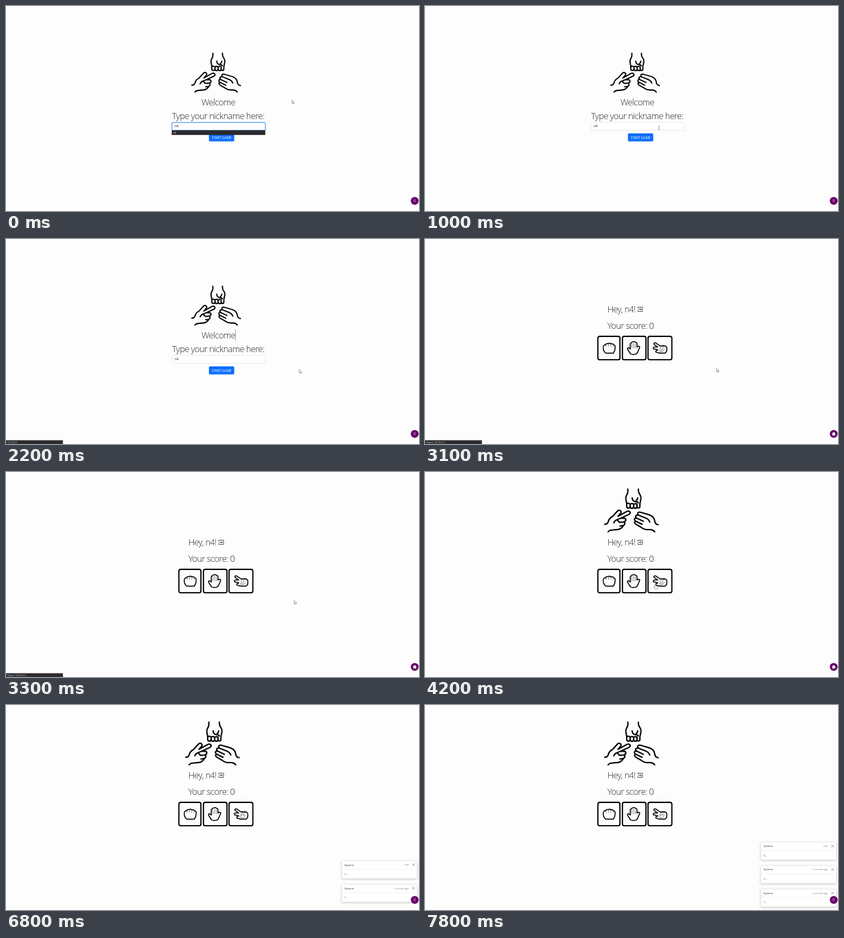
Animation of 600x299 px, one loop 8 s. Source, as an HTML page:

```html
<!DOCTYPE html>
<html lang="en">
<head>
<meta charset="utf-8">
<title>Rock paper scissors</title>
<style>
  html, body { margin: 0; width: 100%; height: 100%; overflow: hidden; background: #fefdfe; }
  svg { display: block; width: 600px; height: 299px; font-family: "Open Sans", sans-serif; fill: #212529; }
  .big { font-size: 12.7px; font-weight: 300; letter-spacing: -.04em; }
  .line { fill: none; stroke: #000; stroke-width: 1.8; stroke-linecap: round; stroke-linejoin: round; }
  .small { font-size: 4.8px; }
  .toast text { font-size: 3.9px; fill: #555b61; }
  .toast .age { font-size: 3.4px; fill: #7d848a; text-anchor: end; }
  .toast { filter: drop-shadow(0 1px 1.5px #0003); }
</style>
</head>
<body>
<svg viewBox="0 0 600 299">
  <defs>
    <g id="hands" class="line">
      <!-- rock -->
      <path d="M31.5 .8V4.5Q31.5 6.5 29.8 9 28.6 11 28.9 14L30 20M45.5 .8V3.5Q45.7 6 48 9 49.2 11 48.8 14L47.5 20M30 20v3.8q.2 2.4 2.3 2.4t2.3-2.4V21M34.6 21v2.8q.2 2.6 2.3 2.6t2.3-2.6V21M39.2 21v2.8q.2 2.6 2.2 2.6t2.2-2.6V20.5M43.6 23.8q.2 2.2 2 2.2t1.9-2.4V20M30 20.5q2.3-2 4.6.5 2.3-2 4.6 0 2.2-1.5 4.4-.3M37.2 12.5Q37.5 17 41.5 17.5q3 0 3.8 1.5M44.5 12.5q0 2.5-2 3.5"/>
      <!-- scissors -->
      <path d="M1 47.5Q4.5 47.5 5.5 44.5 7 39 11 37.5L18 29.8q2-1.7 3.7-.2t.2 3.4L18.5 37 30.5 30.3q2.8-1 3.8.9t-1.3 3.2L22 39.5M22 39.5l4.5-.2q2.5.4 2.3 2.6t-3 2.6l-5 .4M26.8 44.6q1.5 1.6.3 3.3t-6 1.8M25.5 49.5Q23 54 17.5 54.5L12 55Q7.5 55 5.5 57.5M13 45.5Q14.5 42 17.5 41.3L22 39.5M18 41.3q.3 2.6 3 3.6"/>
      <!-- paper -->
      <path d="M71.5 48Q67.5 47.5 67 43 66.5 37.5 60 35L48 31.5q-3-.5-3.5 1.5-.3 1.5 1.5 2.5l9 3.7M46 35.5q-3-1-4 .8-.6 2 1.5 3.2l8.5 4M43.5 39.5q-3-.8-3.3 1.3 0 1.7 2 2.7l8 4M42.2 43.5q-2.2.3-1.7 2 .5 1.5 2 2.2l7 4q3 2.8 8 2.8h4q4 .5 5.5 3M55 39.2Q59 40.5 60.5 44.5"/>
    </g>
  </defs>

  <g id="welcome">
    <use href="#hands" x="269" y="68"/>
    <g class="big" text-anchor="middle">
      <text x="308.5" y="145.3">Welcome</text>
      <text x="308.3" y="164.7">Type your nickname here:</text>
    </g>
    <path id="caret" d="M333.5 132V148.5" stroke="#888" stroke-width=".7"/>
    <rect id="input" x="241" y="169.8" width="135.8" height="11.5" rx="1.6" fill="#fff"/>
    <text class="small" x="245" y="177.4">n4</text>
    <rect id="button" x="294.8" y="185.8" width="36.8" height="11.8" rx="1.7"/>
    <text class="small" x="313.2" y="193.6" fill="#fff" text-anchor="middle">START GAME</text>
    <g id="suggest">
      <rect x="240.7" y="181.2" width="136" height="6.9" fill="#2b2a2e"/>
      <text x="242.6" y="186" font-size="3.6" fill="#fff">n4</text>
    </g>
  </g>

  <g id="game">
    <use id="logo" href="#hands" transform="translate(260 24) scale(1.1)"/>
    <g class="big">
      <text x="265" y="107.2">Hey, n4!</text>
      <text x="265" y="131.2">Your score: 0</text>
    </g>
    <path class="line" style="stroke:#333;stroke-width:.8" d="M309.2 101V99.4H316V105.6H309.2V104M310.5 102.5H314M312.8 101.2L314.1 102.5 312.8 103.8"/>
    <g class="line">
      <rect x="251.2" y="142" width="32" height="34.2" rx="2.6"/>
      <rect x="286.8" y="142" width="34.2" height="34.2" rx="2.6"/>
      <rect x="324" y="142" width="34.6" height="34.2" rx="2.6"/>
    </g>
    <g class="line" style="stroke-width:1.4">
      <path d="M262.5 166.5Q258.5 163 259 157.5 259.3 154 262.5 154.3 263 152 265.7 152.6 268.5 151.2 270 153 273 152 273.8 154.3 276.6 154.5 276.3 158 276.3 163 273.6 166.5Z"/>
      <path d="M298.5 167.5L294.5 161.2Q293.5 159 295.6 158.5L298.2 160.5V153Q298.4 151.2 299.9 151.7 300.6 149.4 302.7 150 304.6 148.7 305.8 151 308 150.7 308 153V157.5Q311.5 155.2 312 158L309.2 164.5Q307.8 168.4 304 168.4 300.5 168.8 298.5 167.5Z"/>
      <path d="M341.5 156L335.2 151.6Q332.6 151 332.4 153.2L338 157.6 333.2 157.4Q331 158.2 332 160.3L338.2 161.6 335.6 163.2Q334.6 165 336.6 165.4L341 166.5H348.5Q351.6 165 351.4 160.5 351.6 156.5 348 155.8Z"/>
    </g>
    <path class="line" style="stroke:#444;stroke-width:.6" d="M263 154.5V157M266.5 153.5V156.5M270 153.5V156.5M273.4 155V157M300.3 153V159M303 152V159M305.7 153V159M343 157.5L341.5 161M346 157.5L344 162.5H340.5M347.5 160.5L345 164.5H341"/>
  </g>

  <g id="status">
    <rect y="293.5" width="82.7" height="5.5" fill="#2b2a2e"/>
    <text id="statusText" x="1.2" y="297.9" font-size="3.7" fill="#ddd"/>
  </g>
  <g id="toasts"></g>
  <circle cx="593.8" cy="284.3" r="5.7" fill="#660066"/>
  <text id="count" x="593.8" y="286.1" font-size="5" fill="#fff" text-anchor="middle">0</text>
  <path id="lock" d="M592 283.6a1.8 1.9 0 0 1 3.6 0h.4v3h-4.4v-3z" fill="#fff"/>

  <g id="cursor" stroke="#666" stroke-width=".55" stroke-linejoin="round">
    <path id="arrow" d="M0 0V5.2L1.2 4.2 2 6 2.9 5.6 2.1 3.9H3.7Z" fill="#fff"/>
    <path id="beam" d="M-1.2 0H1.2M0 0V5M-1.2 5H1.2" fill="none"/>
    <path id="finger" d="M0 .4Q.7-.4 1.3.4V2.7L4 3.4Q4.5 3.8 4.4 5L3.8 7.2H.4L-1.8 4.4Q-1.6 3.4-.7 3.9L0 4.5Z" fill="#fff"/>
  </g>
</svg>
<script>
const LOOP = 8000, STEP = 100;
const el = id => document.getElementById(id);
const show = (id, on) => el(id).style.display = on ? "" : "none";

// time, x, y
const path = [
  [0, 415.5, 137], [200, 415.5, 137], [1000, 340, 175.3], [1300, 347, 182],
  [1800, 317, 190], [2000, 317, 190], [2200, 426, 190.2], [2500, 426, 190.2],
  [2700, 423.6, 188.6], [3200, 423.6, 188.6], [3900, 334, 163.5],
  [4200, 334, 163.5], [4700, 340, 160.6], [5100, 340, 160.6], [5800, 342, 157.5], [LOOP, 342, 157.5]
];

function pointer(t) {
  const i = path.findIndex(p => p[0] > t);
  const [t0, x0, y0] = path[i - 1], [t1, x1, y1] = path[i];
  const u = (t - t0) / (t1 - t0), e = u * u * (3 - 2 * u);
  return [x0 + (x1 - x0) * e, y0 + (y1 - y0) * e];
}

function toast(n, y, age) {
  const when = age ? age + " seconds ago" : "now";
  return `<g class="toast" transform="translate(487.8 ${y})">
    <rect width="109.5" height="25.8" rx="1.2" fill="#fff" stroke="#dcdcdf" stroke-width=".5"/>
    <path d="M0 12.4H109.5" stroke="#e8e8ea" stroke-width=".5"/>
    <text x="3.9" y="7.3" font-weight="600">System</text>
    <text class="age" x="97.4" y="7.2">${when}</text>
    <path d="M102.3 3.8l4 4m0-4l-4 4" stroke="#777" stroke-width=".6"/>
    <text x="3.9" y="20.6">${n}...</text></g>`;
}

function toasts(t) {
  const count = t < 5400 ? 0 : Math.floor((t - 5400) / 1000) + 1;
  const bottom = count > 2 ? 268.4 : 261.5;
  let out = "";
  for (let n = 1; n <= count; n++) out += toast(n, bottom - 34.2 * (n - 1), count - n);
  return out;
}

let last = -1;
function draw(now) {
  requestAnimationFrame(draw);
  const t = Math.floor(now % LOOP / STEP) * STEP;
  if (t === last) return;
  last = t;
  const home = t < 3100, focused = t < 300;
  const [x, y] = pointer(t);
  const inside = (l, top, r, b) => x > l && x < r && y > top && y < b;
  const overInput = home && inside(241, 169, 377, 181);
  const overButton = home && inside(295, 185, 332, 198);
  const overCard = !home && inside(250, 141, 360, 177);

  show("welcome", home);
  show("game", !home);
  show("logo", t >= 3400);
  show("suggest", focused);
  show("caret", t >= 400 && t < 900 || t >= 1400);
  el("input").setAttribute("stroke", focused ? "#5ba2f7" : "#d6dadf");
  el("input").setAttribute("stroke-width", focused ? 1.2 : .6);
  el("button").setAttribute("fill", overButton ? "#0b5ed7" : "#0d6efd");

  show("status", t >= 2100 && t < 3600);
  el("statusText").textContent = home ? "127.0.0.1" : "Поиск 127.0.0.1…";
  const locked = !home && t < 5400;
  show("lock", locked);
  show("count", !locked);
  el("toasts").innerHTML = toasts(t);

  el("cursor").setAttribute("transform", `translate(${x} ${y})`);
  show("beam", overInput);
  show("finger", overButton || overCard);
  show("arrow", !(overInput || overButton || overCard));
}
requestAnimationFrame(draw);
</script>
</body>
</html>
```
